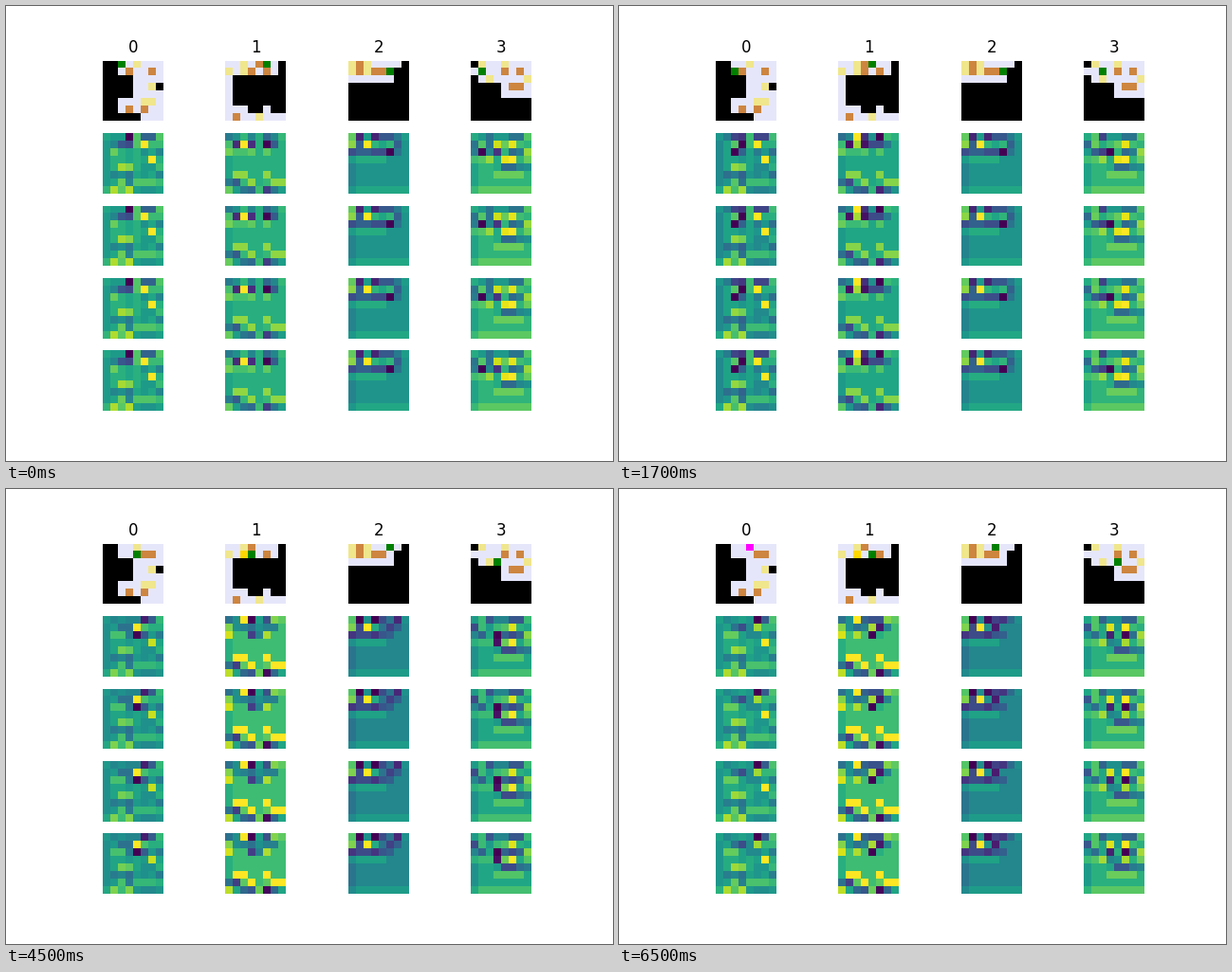
A matplotlib script for the animation above (8 s loop, 640 by 480 pixels).

```python
import numpy as np
import matplotlib.pyplot as plt
from matplotlib.animation import FuncAnimation
from matplotlib.colors import ListedColormap

SIZE = 8
WALL, FLOOR, TARGET, BOX, PLACED, PLAYER, PLAYER_ON_TARGET, OUTSIDE = range(8)
TILE_COLORS = ListedColormap(
    ["black", "lavender", "khaki", "peru", "gold", "green", "magenta"])
STEPS = {"U": (-1, 0), "D": (1, 0), "L": (0, -1), "R": (0, 1)}
INTERVAL = 500
FRAMES = 16
FRAMES_PER_MOVE = 4

# What a neighbour in each direction adds to a cell; "" is the cell itself
INFLUENCE = [
    ((FLOOR,), {"": -.2, "R": -.2, "UR": .15, "D": .25}),
    ((TARGET,), {"L": -.25, "R": -.25, "U": .1, "UR": .1, "D": .2}),
    ((BOX, PLACED), {"": -.15, "R": .2}),
    ((PLAYER, PLAYER_ON_TARGET),
     {"": -.2, "U": -.55, "L": -.3, "R": -.15, "UL": -.2}),
    ((OUTSIDE,), {"L": -.1, "D": .12, "U": .05}),
]

area = np.s_
LEVELS = [
    dict(walls=[area[:, :2], area[2:5, :4], area[7, :5], area[3, 7]],
         targets=[area[0, 4], area[3, 6], area[5, 5:7]],
         boxes=[area[1, 3::3], area[6, 3:6:2]],
         player=(0, 2), moves="DRRU"),
    dict(walls=[area[:2, 7], area[2:6, 1:], area[6, 3:5], area[6, 6:]],
         targets=[area[:2, 2], area[1, 0], area[7, 4]],
         boxes=[area[0, 4], area[1, 3:6:2], area[7, 1]],
         player=(0, 5), moves="LDLR"),
    dict(walls=[area[0, 7], area[1:3, 6:], area[3:]],
         targets=[area[:2, :3:2]],
         boxes=[area[:2, 1], area[1, 3:5]],
         player=(1, 5), moves="LLUL"),
    dict(walls=[area[:3:2, 0], area[3:5, :4], area[5:]],
         targets=[area[0, 1:5:3], area[2, 2::5]],
         boxes=[area[1, 4:7:2], area[3, 5:7]],
         player=(1, 1), moves="RRDR"),
]


def mask(areas):
    cells = np.zeros((SIZE, SIZE), bool)
    for part in areas:
        cells[part] = True
    return cells


def offset(directions):
    return (sum(STEPS[d][0] for d in directions),
            sum(STEPS[d][1] for d in directions))


def play(level, count):
    """Return the tiles after the first `count` moves."""
    walls, targets, boxes = (mask(level[k]) for k in ("walls", "targets", "boxes"))
    player = level["player"]

    def is_free(cell):
        inside = min(cell) >= 0 and max(cell) < SIZE
        return inside and not walls[cell] and not boxes[cell]

    for move in level["moves"][:count]:
        dr, dc = STEPS[move]
        ahead = (player[0] + dr, player[1] + dc)
        beyond = (ahead[0] + dr, ahead[1] + dc)
        if boxes[ahead] and is_free(beyond):
            boxes[ahead], boxes[beyond] = False, True
        if is_free(ahead):
            player = ahead

    room = np.where(walls, WALL, np.where(targets, TARGET, FLOOR))
    room[boxes] = np.where(targets, PLACED, BOX)[boxes]
    room[player] = PLAYER_ON_TARGET if targets[player] else PLAYER
    return room


def activation(room):
    padded = np.pad(room, 1, constant_values=OUTSIDE)
    values = np.zeros(room.shape)
    for kinds, weights in INFLUENCE:
        present = np.isin(padded, kinds)
        for directions, weight in weights.items():
            dr, dc = offset(directions)
            values += weight * present[1 + dr:1 + dr + SIZE, 1 + dc:1 + dc + SIZE]
    return values


fig, axes = plt.subplots(5, 4, figsize=(6.4, 4.8), dpi=100)
blank = np.zeros((SIZE, SIZE))
room_images, map_images = [], []
for column in range(4):
    top, *rest = axes[:, column]
    top.set_title(str(column))
    room_images.append(top.imshow(blank, cmap=TILE_COLORS, vmin=-.5, vmax=6.5))
    map_images.append([ax.imshow(blank, cmap="viridis") for ax in rest])
for ax in axes.flat:
    ax.axis("off")


def update(frame):
    # The first move comes after one frame, the others at a steady pace
    count = (frame + FRAMES_PER_MOVE - 1) // FRAMES_PER_MOVE
    for level, room_image, maps in zip(LEVELS, room_images, map_images):
        room = play(level, count)
        room_image.set_data(room)
        values = activation(room)
        for image in maps:
            image.set_data(values)
            image.set_clim(values.min(), values.max())
    return room_images + sum(map_images, [])


animation = FuncAnimation(fig, update, frames=FRAMES, interval=INTERVAL, repeat=True)
plt.show()
```
